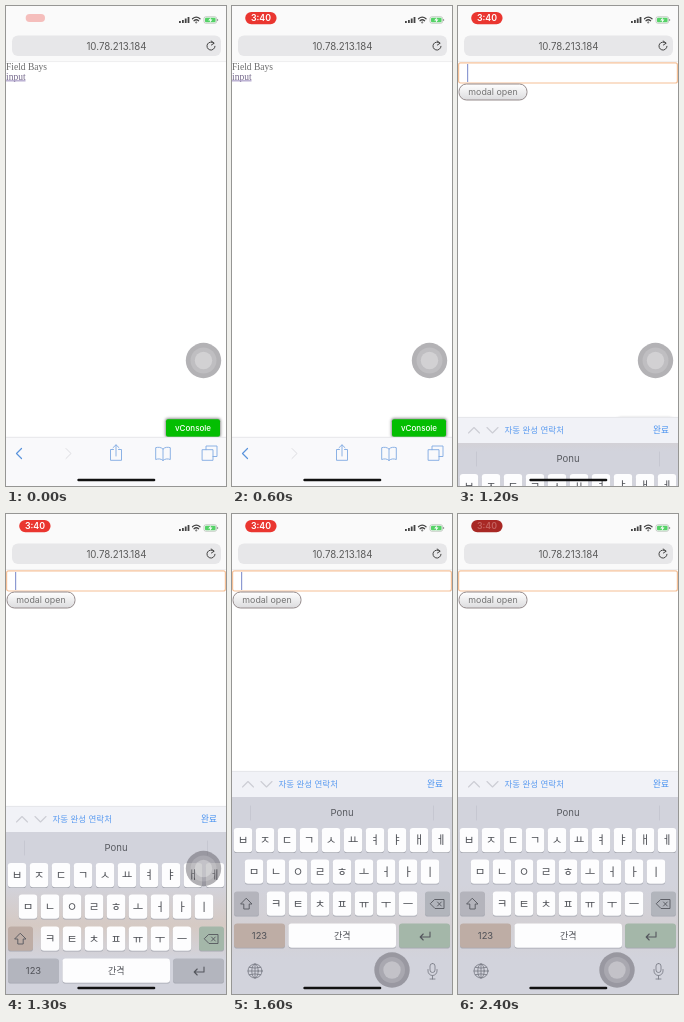
Animation, 220 px wide and 480 px high, one loop 2500 ms. Source, as an HTML page:

```html
<!DOCTYPE html>
<html lang="ko">
<head>
<meta charset="utf-8">
<title>Mobile input focus</title>
<style>
html, body { margin: 0; width: 100%; height: 100%; overflow: hidden; background: #fff; }
#stage { display: block; width: 220px; height: 480px; }
text { font-family: Inter, "Liberation Sans", Arial, sans-serif; }
.ko { font-family: "Noto Sans CJK KR", "Noto Sans CJK", sans-serif; }
.serif { font-family: "Liberation Serif", Times, serif; }
.line { fill: none; stroke-linecap: round; stroke-linejoin: round; }
</style>
</head>
<body>
<svg id="stage" viewBox="0 0 220 480">
  <defs>
    <linearGradient id="btn" x2="0" y2="1">
      <stop stop-color="#fff"/><stop offset="1" stop-color="#dcdcde"/>
    </linearGradient>
    <linearGradient id="warm" x2="0" y2="1">
      <stop stop-color="#d8c4b4" stop-opacity="0"/>
      <stop offset=".55" stop-color="#d8c4b4"/>
      <stop offset="1" stop-color="#d8c4b4" stop-opacity="0"/>
    </linearGradient>
    <filter id="soft" x="-20%" y="-40%" width="140%" height="180%">
      <feGaussianBlur stdDeviation="1.5"/>
    </filter>
  </defs>
  <rect width="220" height="480" fill="#fff"/>

  <g id="links">
    <rect id="tap" y="62" width="21" height="15" rx="2" fill="#cfcfd4"/>
    <text class="serif" y="64" font-size="9.5" fill="#6c6c6c">Field Bays</text>
    <text id="link" class="serif" y="73.5" font-size="9.5">input</text>
    <path id="under" d="M0 74.8H19.5" stroke-width="1.3"/>
  </g>

  <g id="form">
    <rect x=".6" y="56.8" width="218.8" height="20.2" rx="2" fill="#fff" stroke="#f6c096" stroke-width="1.2"/>
    <rect id="caret" x="9" y="58" width="1.2" height="18" fill="#8d9ad2"/>
    <rect x="1" y="78" width="68" height="16" rx="7.5" fill="url(#btn)" stroke="#958b8c"/>
    <text x="35" y="89.4" font-size="8.9" text-anchor="middle" fill="#747474">modal open</text>
  </g>

  <g id="console">
    <rect x="159.5" y="412.5" width="55" height="19" rx="2" fill="#555" opacity=".8" filter="url(#soft)"/>
    <rect x="160" y="413.3" width="54" height="17.4" rx="2" fill="#04be02"/>
    <text x="187" y="425.2" font-size="8" font-weight="500" text-anchor="middle" fill="#fff">vConsole</text>
  </g>

  <g id="toolbar" class="line" stroke="#7faae2">
    <path d="M0 431H220V480H0Z" fill="#f9f9fb" stroke="none"/>
    <path d="M0 431.3H220" stroke="#dedee2" stroke-width=".7"/>
    <path d="M15.5 442.5L10.5 447.5L15.5 452.5" stroke="#5a93dc" stroke-width="1.2"/>
    <path d="M60 442.5L65 447.5L60 452.5" stroke="#dddde1"/>
    <path d="M107.5 443.5H104.5V454.3H115.5V443.5H112.5M110 450V439M107 441.7L110 438.8L113 441.7" stroke-width=".9"/>
    <path d="M157 443C155 441 152 441 149.7 441.7V453.5C152 452.6 155 452.6 157 454.5C159 452.6 162 452.6 164.3 453.5V441.7C162 441 159 441 157 443V454.5" stroke-width=".9"/>
    <path d="M196.5 443.7H207V454.3H196.5ZM200 443.7V440H211V450.5H207" stroke-width=".9"/>
  </g>

  <g>
    <rect width="220" height="56" fill="#fafafa"/>
    <path d="M0 55.6H220" stroke="#ebebed" stroke-width=".8"/>
    <rect x="6" y="29.5" width="209" height="20.5" rx="6" fill="#e7e7e9"/>
    <text x="110.5" y="43.5" font-size="9.7" text-anchor="middle" fill="#5a5a5a">10.78.213.184</text>
    <path class="line" d="M207.8 37.2A4 4 0 1 0 209 40.3M205.2 35L208.2 37.2L205.4 39" stroke="#444"/>
    <path d="M173 15h1.8v2h-1.8zM176 14h1.8v3h-1.8zM178.8 12.6h1.8v4.4h-1.8zM181.6 11h1.8v6h-1.8z" fill="#444"/>
    <g class="line" stroke="#444" stroke-width="1.3">
      <path d="M186.5 12.8Q190.3 9.6 194 12.8M188 14.7Q190.3 12.8 192.6 14.7"/>
      <circle cx="190.3" cy="16.4" r=".3"/>
    </g>
    <rect x="198" y="10.8" width="12.6" height="6.4" rx="1.8" fill="#fff" stroke="#a9b5aa" stroke-width=".7"/>
    <rect x="199" y="11.8" width="10.6" height="4.4" rx="1" fill="#55d267"/>
    <path d="M211.6 13V15" stroke="#999"/>
    <path d="M205 11.2L202.2 14.5H204.2L203.6 17L206.5 13.5H204.5Z" fill="#fff"/>
    <rect id="pill"/>
    <text id="clock" x="29" y="15.2" font-size="8.8" font-weight="600" text-anchor="middle">3:40</text>
  </g>

  <g id="keyboard">
    <svg width="220" height="225">
      <rect width="220" height="225" fill="#d2d3dc"/>
      <rect id="glow" width="220" height="75" fill="url(#warm)"/>
      <rect width="220" height="26" fill="#f1f2f7"/>
    </svg>
    <path d="M0 .4H220" stroke="#e1e2e7" stroke-width=".8"/>
    <g class="line" stroke="#cccdd4" stroke-width="1.1">
      <path d="M10.5 16L16 10.5L21.5 16M29 10.5L34.5 16L40 10.5"/>
      <path d="M18.5 35V49M201.5 35V49" stroke="#c3c5ce" stroke-width=".8"/>
    </g>
    <text class="ko" x="46.5" y="15.8" font-size="8.5" fill="#5c9cf0">자동 완성 연락처</text>
    <text class="ko" x="195" y="16" font-size="8.6" font-weight="500" fill="#4590f0">완료</text>
    <text x="110" y="45.3" font-size="9.6" text-anchor="middle" fill="#5a5c62">Ponu</text>
    <g id="keys"></g>
    <g class="line" stroke="#55575e" stroke-width=".9">
      <path d="M14.5 127.5L20 133H17.2V138H11.8V133H9Z"/>
      <path d="M203 128.5H212V137.5H203L198.5 133ZM205.5 131L209.3 135M209.3 131L205.5 135"/>
      <path d="M198 161V166H188.5M191.2 163L188.2 166L191.2 169" stroke-width="1.1"/>
      <g stroke="#747781" stroke-width=".8">
        <circle cx="23" cy="200" r="7"/><ellipse cx="23" cy="200" rx="3.2" ry="7"/>
        <path d="M16 200H30M23 193V207M17.2 196.3Q23 198 28.8 196.3M17.2 203.7Q23 202 28.8 203.7"/>
        <rect x="198" y="192.5" width="5" height="9" rx="2.5"/>
        <path d="M196 198.5V200A4.5 4.5 0 0 0 205 200V198.5M200.5 204.7V208M198 208H203"/>
      </g>
    </g>
  </g>

  <g id="touch">
    <circle r="17.7" fill="#48464c" fill-opacity=".41"/>
    <circle r="13" fill="#fff" fill-opacity=".16"/>
    <circle r="8.7" fill="#fff" fill-opacity=".3"/>
  </g>
  <rect x="71.3" y="472.8" width="78" height="2.4" rx="1.2" fill="#111"/>
</svg>
<script>
const LOOP = 2500, STEP = 100, KEYS_TOP = 257, KEYS_H = 223;
const $ = id => document.getElementById(id);
const set = (el, attrs) => {
  for (const k in attrs) el.setAttribute(k, attrs[k]);
  return el;
};
const add = (parent, tag, attrs, text = "") => {
  const el = set(document.createElementNS("http://www.w3.org/2000/svg", tag), attrs);
  el.textContent = text;
  return parent.appendChild(el);
};
const show = (id, on) => set($(id), { visibility: on ? "visible" : "hidden" });
const mix = (a, b, p) => a.map((v, i) => v + (b[i] - v) * p);
const rgb = c => `rgb(${c.map(Math.round)})`;

// Keys; special ones pick up the blurred page colour behind them
const GREY = [179, 181, 190], TAN = [190, 173, 165], GREEN = [164, 183, 169];
const special = [];
function key(x, y, w, label, size, tint) {
  const box = { x, y, width: w, height: 24.2, rx: 3.2 };
  add($("keys"), "rect", { ...box, y: y + .9, fill: "#a6a8b1" });
  const face = add($("keys"), "rect", { ...box, fill: "#fdfdfe" });
  if (tint) special.push({ face, tint, mid: y + 12 });
  if (label) add($("keys"), "text", {
    x: x + w / 2, y: y + 12.3 + size * .36, "font-size": size, "text-anchor": "middle",
    fill: "#505258", class: label === "123" ? "" : "ko"
  }, label);
}
[["ㅂㅈㄷㄱㅅㅛㅕㅑㅐㅔ", 11, 57], ["ㅁㄴㅇㄹㅎㅗㅓㅏㅣ", 22, 88.5], ["ㅋㅌㅊㅍㅠㅜㅡ", 44, 120.5]]
  .forEach(([row, x, y]) => [...row].forEach((c, i) => key(x + i * 22 - 9.2, y, 18.4, c, 11.5)));
key(2, 120.5, 25, "", 0, TAN);
key(193, 120.5, 25, "", 0, GREEN);
key(2, 152.5, 51, "123", 9.4, TAN);
key(56.5, 152.5, 107.5, "간격", 9);
key(167, 152.5, 51, "", 0, GREEN);

// time, x, y of the floating button
const TOUCH = [[0, 197.5, 354.5], [1400, 197.5, 354.5], [1500, 178, 411], [1600, 160, 456], [2400, 159, 456]];
function along(path, t) {
  const i = path.findIndex(p => p[0] > t);
  if (i < 0) return path[path.length - 1].slice(1);
  const a = path[i - 1], b = path[i];
  return mix(a, b, (t - a[0]) / (b[0] - a[0])).slice(1);
}

function drawPill(t) {
  const p = Math.min(1, t / 400), dim = t >= 2400;
  const [x, y, w, h] = mix([19.7, 8, 19.3, 8], [13.2, 6, 31.4, 12.2], p);
  set($("pill"), { x, y, width: w, height: h, rx: h / 2,
    fill: dim ? "#a82824" : "#ea3630", opacity: .3 + .7 * p });
  set($("clock"), { fill: dim ? "#c4625e" : "#fff", opacity: p });
}

function drawKeyboard(t) {
  const rest = KEYS_H * Math.exp(-(t - 1175) * .01476);
  const top = Math.round(KEYS_TOP + rest);
  set($("keyboard"), { transform: `translate(0 ${top})` });
  set($("glow"), { y: 370 - top, opacity: .2 + .4 * Math.min(1, rest / 35) });
  for (const { face, tint, mid } of special) {
    const near = Math.max(0, 1 - ((top + mid - 422) / 34) ** 2);
    set(face, { fill: rgb(mix(GREY, tint, near)) });
  }
}

function draw(t) {
  const form = t >= 1200, tapped = t >= 1000 && !form;
  show("links", !form);
  show("form", form);
  show("keyboard", form);
  set($("tap"), { opacity: tapped ? 1 : 0 });
  set($("link"), { fill: tapped ? "#94687f" : "#75698c" });
  set($("under"), { stroke: tapped ? "#a5728c" : "#b0a4cb" });
  set($("caret"), { opacity: t < 1900 ? 1 : 0 });
  drawPill(t);
  if (form) drawKeyboard(t);
  set($("touch"), { transform: `translate(${along(TOUCH, t)})` });
}

const start = performance.now();
function tick() {
  const t = (performance.now() - start) % LOOP;
  draw(Math.floor(t / STEP) * STEP);
  requestAnimationFrame(tick);
}
tick();
</script>
</body>
</html>
```
